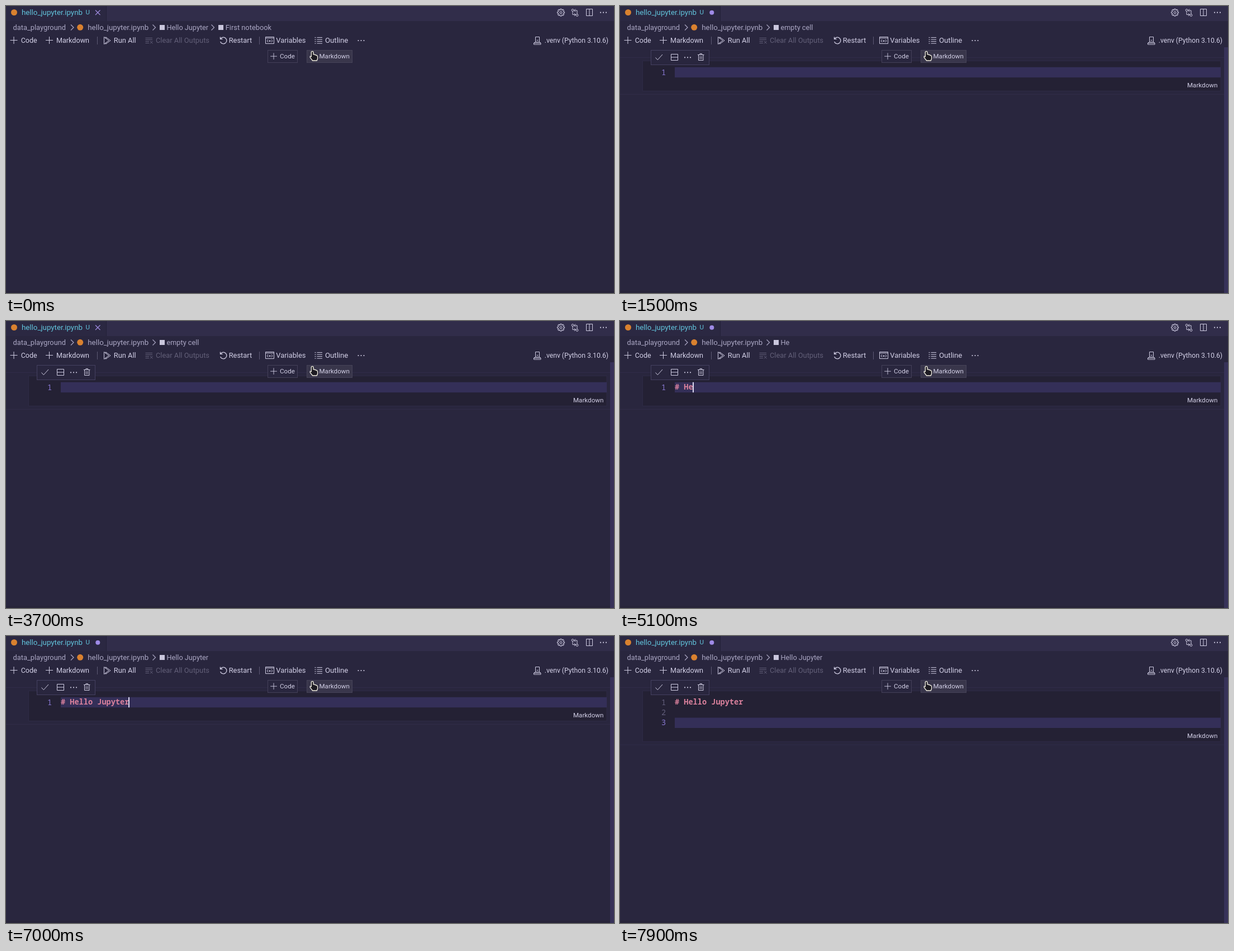
An HTML page for the animation above (8000 ms loop, 1088x515 px).

```html
<!DOCTYPE html>
<html lang="en">
<head>
<meta charset="utf-8">
<title>Notebook editor</title>
<style>
  html, body { margin: 0; width: 100%; height: 100%; overflow: hidden; background: #29263e; }
  svg { display: block; }
  text { font-family: Roboto, "Open Sans", sans-serif; font-size: 12.85px; fill: #d2cfe6; white-space: pre; }
  .tab text { font-size: 13.3px; fill: #62c4dc; }
  .crumbs text { fill: #aba7c4; }
  .small text, text.small { font-size: 11.6px; }
  .dim text { fill: #625f78; }
  .code text { font: bold 13.6px "Noto Sans Mono", "DejaVu Sans Mono", monospace; fill: #d9809c; }
  .code text.num { font-weight: 400; fill: #625e7b; }
  .code text.now { fill: #8777cf; }
  .line { fill: none; stroke: #cfcce2; stroke-width: 1; }
  .dim .line { stroke: #625f78; }
  .chev { fill: none; stroke: #a9a5c2; stroke-width: 1.2; }
  .dots { fill: #cfcce2; }
  .mark { fill: #c9c6dc; }
  .badge { fill: #d9812f; }
  .sep { fill: #5d5974; }
</style>
</head>
<body>
<svg width="1088" height="515" viewBox="0 0 1088 515">
  <defs>
    <path id="plus" class="line" d="M-6.5 0H6.5M0 -6.5V6.5"/>
    <path id="chev" class="chev" d="M-2.5 -5L2.5 0L-2.5 5"/>
    <g id="dots" class="dots"><circle cx="-5" r="1.1"/><circle r="1.1"/><circle cx="5" r="1.1"/></g>
    <rect id="mark" class="mark" x="-4.5" y="-4.5" width="9" height="9"/>
    <path id="tooth" d="M-1.6 -4.3L-1.2 -6.5H1.2L1.6 -4.3"/>
  </defs>

  <rect width="1088" height="515" fill="#29263e"/>
  <rect y="511" width="1088" height="4" fill="#272439"/>
  <rect width="1088" height="27" fill="#312d4a"/>
  <rect width="179" height="27" fill="#2b2842"/>
  <rect x="179" width="1" height="27" fill="#232038"/>

  <g class="tab">
    <circle class="badge" cx="14.5" cy="11.5" r="5.5"/>
    <text x="28" y="15.5">hello_jupyter.ipynb</text>
    <text x="142.5" y="15.3" style="font-size:11.5px">U</text>
    <path id="close" d="M160 7.5L168.5 16M168.5 7.5L160 16" fill="none" stroke="#a08be0" stroke-width="1.2"/>
    <circle id="dirty" cx="164.3" cy="11.7" r="4" fill="#9e8ae6"/>
  </g>

  <g class="line">
    <g id="gear" transform="translate(993 11.7)">
      <circle r="1.9"/>
      <circle r="4.6" stroke-dasharray="1.5 2.113" stroke-dashoffset="-1.06"/>
    </g>
    <circle cx="1014" cy="7.5" r="1.9"/>
    <circle cx="1022" cy="16.5" r="1.9"/>
    <path d="M1014 9.5V15.5H1019M1017 13L1019.4 15.5L1017 18M1022 14.5V8H1017M1019 5.5L1016.6 8L1019 10.5"/>
    <path d="M1038.5 5.5H1049.5V17.5H1038.5ZM1044 5.5V17.5"/>
  </g>
  <use href="#dots" x="1069" y="11.7"/>

  <g class="crumbs">
    <text x="12.5" y="42.5">data_playground</text>
    <use href="#chev" x="118.5" y="38.5"/>
    <circle class="badge" cx="132.7" cy="38.3" r="5.5"/>
    <text x="146.3" y="42.5" style="font-size:13.3px">hello_jupyter.ipynb</text>
    <use href="#chev" x="265" y="38.5"/>
    <use href="#mark" x="279.5" y="38.5"/>
    <text id="crumb" x="287.5" y="42.5" style="font-size:12.7px"></text>
    <g id="subcrumb">
      <use href="#chev" x="370" y="38.5"/>
      <use href="#mark" x="384.5" y="38.5"/>
      <text x="392.7" y="42.5">First notebook</text>
    </g>
  </g>

  <use href="#plus" x="14" y="61.5"/>
  <text x="26.7" y="66" style="font-size:12.5px">Code</text>
  <use href="#plus" x="77.5" y="61.5"/>
  <text x="90" y="66" style="font-size:12.6px">Markdown</text>
  <rect class="sep" x="163" y="55" width="1" height="14"/>
  <path class="line" d="M178.5 58.5V55.8L187 62L178.5 68.2V65.5M175.5 55.5V68.5L184 62Z"/>
  <text x="192.8" y="66">Run All</text>
  <g class="dim">
    <path class="line" d="M249.5 57.5H262M249.5 60.5H262M249.5 63.5H256M249.5 66.5H256M258 63L262.5 67.5M262.5 63L258 67.5"/>
    <text x="268" y="66" style="font-size:12.87px">Clear All Outputs</text>
  </g>
  <path class="line" style="stroke-width:1.3" d="M384.2 58.8A5.8 5.8 0 1 1 383.6 64M383.5 55.5V59.3H387.5"/>
  <text x="398.7" y="66">Restart</text>
  <rect class="sep" x="453" y="55" width="1" height="14"/>
  <path class="line" d="M464.5 67.5V55.5H479.5V67.5ZM464.5 57.5H479.5M468.5 60Q466.8 62.5 468.5 65M475.5 60Q477.2 62.5 475.5 65M470.5 61L473.5 64.5M473.5 61L470.5 64.5"/>
  <text x="483.3" y="66">Variables</text>
  <path class="line" d="M552.5 56.5H554.5M552.5 60H554.5M552.5 63.5H554.5M552.5 67H554.5M556.5 56.5H566M556.5 60H566M556.5 63.5H566M556.5 67H566"/>
  <text x="571" y="66" style="font-size:13.2px">Outline</text>
  <use href="#dots" x="635.5" y="62"/>
  <path class="line" d="M947.5 55.5H954.5V64.5H947.5ZM947.5 64.5L944.5 66.5V69H957V66.5L954.5 64.5M944.5 66.5H957M949.5 61.5H952.5"/>
  <text x="963.7" y="66" style="font-size:12.2px">.venv (Python 3.10.6)</text>

  <g id="cell">
    <rect x="1081" y="74" width="7" height="441" fill="#373259"/>
    <rect y="92" width="1081" height="1" fill="#302c48"/>
    <rect id="foot" width="1081" height="1" fill="#302c48"/>
    <rect id="editor" x="40.5" y="98.5" width="1034.5" fill="#242134" stroke="#2e2a45"/>
    <rect id="active" x="98" width="977" height="18.4" fill="#342f58"/>
    <g class="code">
      <text class="num" x="74" y="123.6">1</text>
      <text class="num" x="74" y="142">2</text>
      <text class="num" x="74" y="160.4">3</text>
      <text id="typed" x="98" y="123.3"></text>
    </g>
    <rect id="caret" width="2" height="18.4" fill="#dddaf2"/>
    <text id="lang" class="small" x="1015">Markdown</text>
  </g>

  <g id="tools">
    <rect x="55.5" y="79.5" width="104" height="26" fill="#29263e" stroke="#444060"/>
    <path class="line" d="M63.5 92.5L67.3 96.7L76 87M91.5 86.5H103.5V97.5H91.5ZM91.5 92H103.5M139 87.5H150.5M143 87.5V85.5H146.5V87.5M140.5 87.5V97.5H149V87.5M143.3 90V95.5M146.2 90V95.5"/>
    <use href="#dots" x="121" y="92.3"/>
  </g>

  <g class="small">
    <rect x="468.5" y="79.5" width="53" height="22" fill="#29263e" stroke="#444059"/>
    <use href="#plus" transform="translate(479 90.2) scale(.9)"/>
    <text x="490" y="94.2">Code</text>
    <rect x="538.5" y="79.5" width="81" height="22" fill="#39364b" stroke="#474459"/>
    <use href="#plus" transform="translate(549 90.2) scale(.9)"/>
    <text x="560.5" y="94.2">Markdown</text>
  </g>
  <path d="M546.3 82.5Q548.2 80.2 550 82.5V87Q552 86 552.7 87.8Q554.7 87 555.3 88.8Q557.5 88.4 557.6 91V94.5L556.3 98H548.6L544.2 92.4Q544.2 89.8 546.3 91Z" fill="#1d1b22" stroke="#f3f0e2" stroke-width="1.3" stroke-linejoin="round"/>
</svg>
<script>
  const LOOP = 8000, LINE = 18.4, CHAR = 8.16, LEFT = 98;
  const TITLE = "# Hello Jupyter";
  const $ = id => document.getElementById(id);
  const nums = document.querySelectorAll(".num");

  // [time, value] steps; the last one reached holds
  const chars = [[0, 0], [3900, 1], [4300, 2], [4700, 3], [5000, 4], [5200, 5], [5300, 6], [5500, 7],
    [5600, 8], [6000, 9], [6200, 10], [6400, 11], [6600, 13], [6800, 14], [6900, 15]];
  const lines = [[0, 1], [7200, 2], [7400, 3]];
  const blink = [[0, 1], [1500, 0], [2000, 1], [2600, 0], [3200, 1], [3700, 0], [3900, 1], [7900, 0]];
  const dirty = [[0, 0], [900, 1], [2000, 0], [3900, 1]];

  const at = (steps, t) => steps.filter(s => s[0] <= t).pop()[1];
  const show = (id, on) => { $(id).style.display = on ? "" : "none"; };
  const setY = (id, y) => $(id).setAttribute("y", y);

  // eight gear teeth around the hub
  for (let i = 0; i < 8; i++) {
    const tooth = document.createElementNS("http://www.w3.org/2000/svg", "use");
    tooth.setAttribute("href", "#tooth");
    tooth.setAttribute("transform", `rotate(${i * 45})`);
    $("gear").append(tooth);
  }

  function crumbText(t, typed) {
    if (t < 1000) return "Hello Jupyter";
    return typed ? typed.slice(2) : "empty cell";
  }

  function draw(t) {
    const n = at(lines, t);
    const shift = (n - 1) * LINE;
    const typed = TITLE.slice(0, at(chars, t));
    const column = n > 1 ? 0 : typed.length;

    show("cell", t >= 900);
    show("tools", t >= 1000);
    show("subcrumb", t < 1000);
    show("dirty", at(dirty, t));
    show("close", !at(dirty, t));
    show("caret", at(blink, t));

    $("typed").textContent = typed;
    $("crumb").textContent = crumbText(t, typed);
    $("caret").setAttribute("x", Math.max(LEFT, Math.round(LEFT - 1 + column * CHAR)));
    $("editor").setAttribute("height", 54 + shift);
    setY("caret", 109.8 + shift);
    setY("active", 109.8 + shift);
    setY("foot", 158 + shift);
    setY("lang", 146.4 + shift);
    nums.forEach((el, i) => {
      el.style.display = i < n ? "" : "none";
      el.classList.toggle("now", i === n - 1);
    });
  }

  const start = performance.now();
  function tick() {
    draw((performance.now() - start) % LOOP);
    requestAnimationFrame(tick);
  }
  tick();
</script>
</body>
</html>
```
